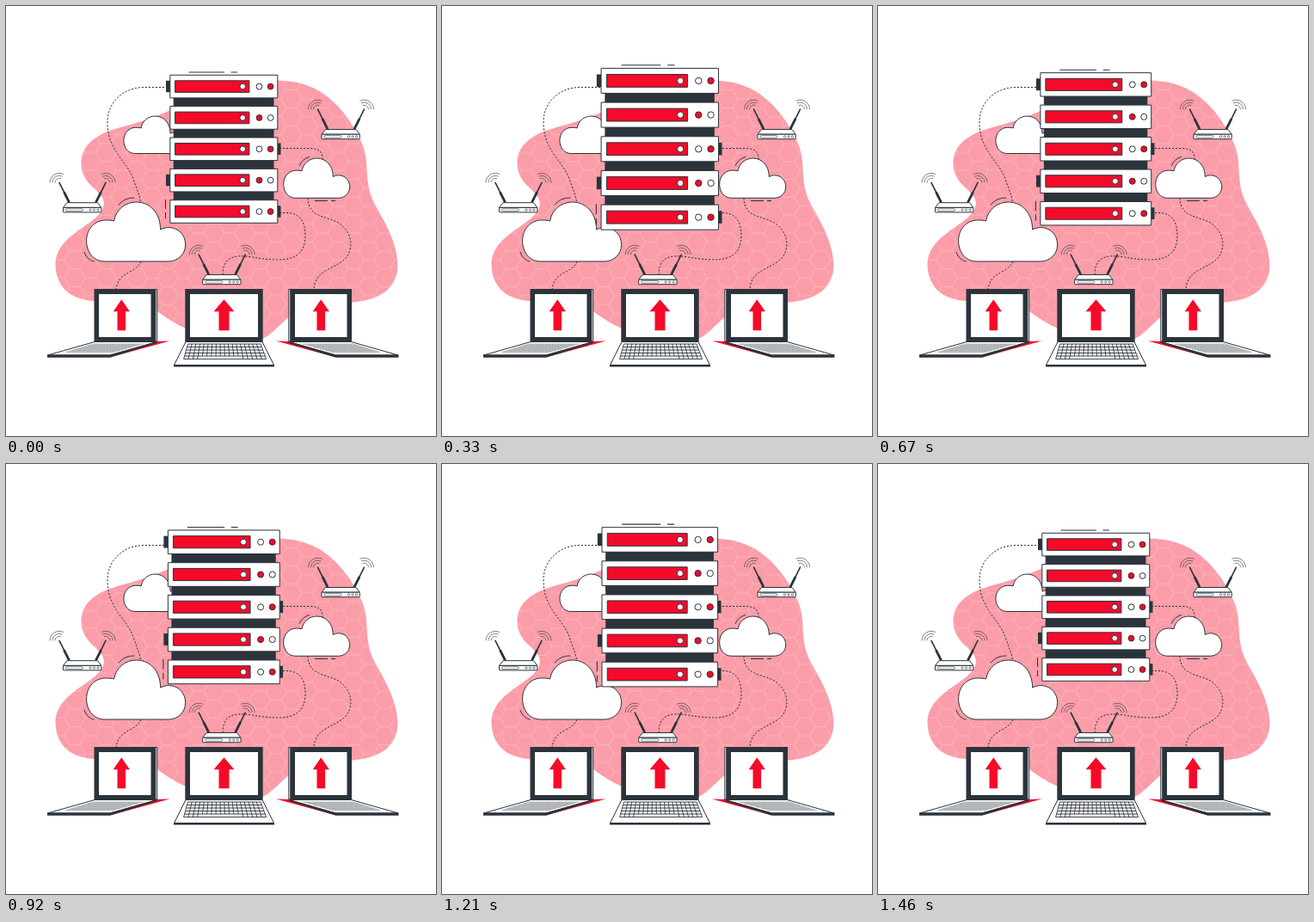
These frames come from a looping animation (500x500 px, 1500 ms). An HTML page:

```html
<!DOCTYPE html>
<html lang="en">
<head>
<meta charset="utf-8">
<title>Server network</title>
<style>
  html, body { margin: 0; width: 100%; height: 100%; overflow: hidden; background: #fff; }
  svg { display: block; width: 100%; height: 100%; }
  .ink { fill: #2b333b; }
  .red { fill: #f60a29; }
  .box { fill: #fff; stroke: #2b333b; stroke-width: 1; vector-effect: non-scaling-stroke; }
  .box.red { fill: #f60a29; }
  .line { fill: none; stroke: #2b333b; stroke-width: 1; }
  .wire { stroke-dasharray: 2.2 1.8; }
  .thin { stroke-width: .6; }
  .keys { stroke-width: .9; }
  .faint { stroke: #9a9fa3; stroke-width: .7; }
</style>
</head>
<body>
<svg viewBox="0 0 500 500">
  <defs>
    <pattern id="hex" width="36" height="20.8" x="8" y="4" patternUnits="userSpaceOnUse">
      <path d="M0 10.4H6L12 0H24L30 10.4H36M6 10.4L12 20.8H24L30 10.4"
        fill="none" stroke="#fff" stroke-opacity=".3" stroke-width=".7"/>
    </pattern>
    <path id="blob" d="M87.500 185C86 163 104 149 130 142C168 132 195 121 225 104C255 86 315 82 346 91
      C380 101 403 134 414 160C424 184 415 202 428 229C440 251 455 274 455.500 302
      C455 326 438 339 414 343C380 349 351 345 330 361C312 375 306 388 288 389
      C250 391 209 381 176 355C154 342 125 347 102 343C72 341 58 324 57.500 301
      C57 280 75 267 94 254C106 246 117 236 113 225C108 213 89 207 87.500 185Z"/>
    <path id="cloud" class="box" d="M115 297C102 297 94 286 94 273C94 259 104 249 116 249
      C120 249 123 249 126 250C128 237 139 228 152 228C168 228 180 241 180 260
      C184 258 187 257.500 190 257.500C201 258 209 266 209 277.500C209 289 200 297 189 297Z"/>
    <g id="antenna">
      <path class="line" stroke-linecap="round" d="M73 227L62 205" style="stroke-width:1.600"/>
      <path class="line" d="M73.500 228L67.500 216" style="stroke-width:2.800"/>
      <path class="line thin" d="M51 205A11 11 0 0 1 67 195.200M54 205A8 8 0 0 1 65.500 197.800M57 205A5 5 0 0 1 64 200.400"/>
    </g>
    <g id="router">
      <use href="#antenna"/>
      <use href="#antenna" transform="matrix(-1 0 0 1 178 0)"/>
      <path class="box" d="M71 228.300H106.500L110.800 234H66.500Z"/>
      <rect class="box" x="66.500" y="234" width="44.300" height="5.500" rx=".6"/>
      <rect class="box thin" x="69.500" y="235.400" width="20" height="2.600" rx="1.300"/>
      <g class="box thin"><circle cx="98" cy="236.700" r="1.200"/><circle cx="102.500" cy="236.700" r="1.200"/><circle cx="107" cy="236.700" r="1.200"/></g>
    </g>
    <path id="arrow" class="red" d="M0 0L12 14H6V36H-6V14H-12Z"/>
    <g id="laptop">
      <path class="red" d="M190.500 389.500L121 408.500L160 393L174 390Z"/>
      <path class="box" d="M172 329.500H175.700V390H172Z"/>
      <path class="ink" d="M102.500 329H174.300V390.500H102.500Z"/>
      <path fill="#fff" d="M108 335H168.500V385H108Z"/>
      <path class="box" d="M103 390.500H175L121 406H48.500Z"/>
      <path class="ink" d="M48 405.500H121L175 390.500V392L121 408.700H48Z"/>
      <g id="hatch"></g>
    </g>
  </defs>

  <use href="#blob" fill="#fb9da8"/>
  <use href="#blob" fill="url(#hex)"/>
  <path class="line wire" d="M188 94.500H160C136 95 118 112 118 135C118 170 142 180 149 204C153 216 157 222 157 236
    M157 297C152 311 130 308 128 330
    M318 165.500H352C364 165.500 369 169 368 181
    M351 223C351 247 375 244 388 253C399 261 402 272 400.500 281C396 308 359 300 358 330
    M318 240.500H327C341 241 348 250 348 267C348 286 338 295 316 295C295 295 284 290 270 291C256 292 252 301 252 313"/>
  <use href="#cloud" transform="translate(77.700 -15.600) scale(.63)"/>
  <use href="#cloud" transform="translate(259.700 24.300) scale(.67)"/>
  <use href="#cloud" x="-.400"/>
  <path class="line" d="M131 231.500C135 226 141 223 149.500 223M91 286C93 292 97 296 102.500 297
    M341 186C343 181 347 177 353 175.500M359 226.500H374M378 226.500H383"/>
  <use href="#router" y=".400"/>
  <use href="#router" transform="translate(300.500 -84.800)"/>
  <use href="#router" transform="translate(162.200 84.200)"/>

  <use href="#laptop"/>
  <use href="#laptop" transform="matrix(-1 0 0 1 504.500 0)"/>
  <path class="ink" d="M208.300 329H298.700V390.500H208.300Z"/>
  <path fill="#fff" d="M214 335H293V385H214Z"/>
  <path class="box" d="M209 390.500H298L311.500 417.500H195.500Z"/>
  <path class="ink" d="M195 417H312V419.500H195Z"/>
  <g id="keys"></g>
  <use href="#arrow" transform="translate(134.300 341.300) scale(.8 1)"/>
  <use href="#arrow" transform="translate(253.500 341.300)"/>
  <use href="#arrow" transform="translate(366.300 341.300) scale(.8 1)"/>

  <g id="server"></g>
</svg>
<script>
const $ = id => document.getElementById(id);
const rect = (cls, x, y, w, h) => `<rect class="${cls}" x="${x}" y="${y}" width="${w}" height="${h}"/>`;
const dot = (red, x, y, r) => `<circle class="box ${red ? 'red' : ''}" cx="${x}" cy="${y}" r="${r}"/>`;
const path = (cls, d) => `<path class="${cls}" d="${d}"/>`;
const range = n => [...Array(n).keys()];

$('server').innerHTML =
  rect('ink', 194.7, 100, 116.8, 130) +
  path('line', 'M212.500 77H254M261.500 77H269M185.500 225V236M185.500 240V247') +
  range(5).map(i => {
    const y = 80.3 + 36.35 * i, mid = y + 13.3;
    const plug = i % 3 == 0 ? rect('ink', 186, mid - 6.8, 5, 13.4)
      : i % 2 == 0 ? rect('ink', 315, mid - 6.8, 4.5, 13.4) : '';
    return plug + rect('box', 190.8, y, 125, 26.6) + rect('box red', 196.6, y + 6.5, 86.3, 13.6) +
      dot(false, 275.2, mid, 3.3) + dot(i % 2, 294.5, mid, 3.4) + dot(i % 2 == 0, 307.6, mid, 3.4);
  }).join('');

// Front keyboard: rows widen towards the viewer, the last one has a space bar gap
const left = y => 211.5 - (y - 393) * .28, right = y => 296 + (y - 393) * .38;
const at = (y, k) => left(y) + (right(y) - left(y)) * k / 18;
$('keys').innerHTML = path('line keys', range(6).map(i => {
  const y = 393 + i * 3.5;
  const columns = i == 5 ? [] : range(19).filter(k => i < 4 || k < 4 || k > 12);
  return `M${left(y)} ${y}H${right(y)}` +
    columns.map(k => `M${at(y, k)} ${y}L${at(y + 3.5, k)} ${y + 3.5}`).join('');
}).join(''));

$('hatch').innerHTML = path('line faint', range(6).map(i => {
  const x = 101 - i * 6.2, y = 393 + i * 1.9;
  return `M${x} ${y}H${x + 59 - i * .6}`;
}).join('')) + path('line faint thin', range(17).map(i =>
  `M${101 + i * 3.6} 393L${70 + i * 3.4} 402.500`).join(''));

// Two pulses per loop: [time in ms, scale]
const LOOP = 1500, STEP = LOOP / 36;
const pulse = [[0, 1], [375, 1.103], [790, 1], [1125, 1.103], [1455, 1], [1500, 1]];
function scaleAt(t) {
  const i = pulse.findIndex(([end]) => end > t);
  const [t0, s0] = pulse[i - 1], [t1, s1] = pulse[i];
  return s0 + (s1 - s0) * (t - t0) / (t1 - t0);
}
function draw() {
  const t = Math.floor((performance.now() % LOOP + 5) / STEP) * STEP % LOOP;
  $('server').setAttribute('transform', `translate(253.300 166.500) scale(${scaleAt(t)}) translate(-253.300 -166.500)`);
  requestAnimationFrame(draw);
}
draw();
</script>
</body>
</html>
```
